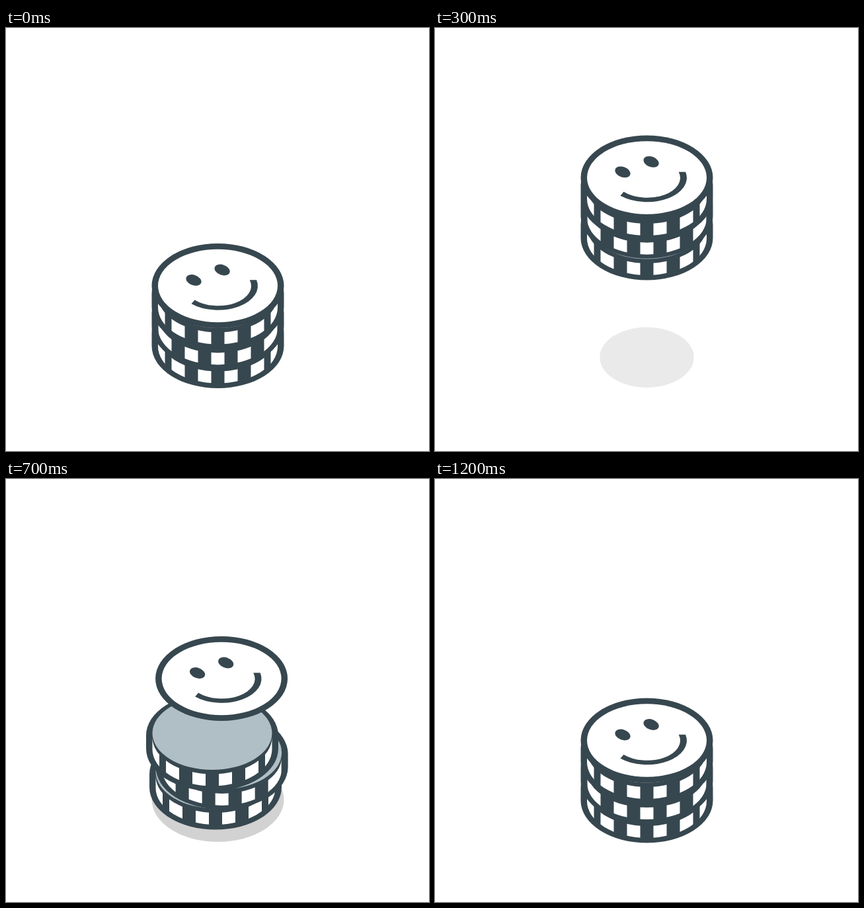
Recreate the animation shown at these times as an HTML page. Size 640 by 640 pixels, loop 1900 ms.

```html
<!DOCTYPE html>
<html lang="en">
<head>
<meta charset="utf-8">
<title>Bouncing stack</title>
<style>
  html, body { margin: 0; width: 100%; height: 100%; overflow: hidden; background: #fff; }
  svg { display: block; width: 100vw; height: 100vh; }
  .ink { fill: #37474f; }
  .paper { fill: #fff; }
  .lid { fill: #b0bec5; }
</style>
</head>
<body>
<svg viewBox="0 0 640 640">
  <defs>
    <clipPath id="rim">
      <path d="M-90.5 -17A90.5 55.5 0 0 0 90.5 -17V1A90.5 55.5 0 0 1 -90.5 1Z"/>
    </clipPath>
  </defs>
  <ellipse id="shadow"/>
  <g id="stack"></g>
  <g id="face">
    <ellipse class="ink" rx="100" ry="64"/>
    <ellipse class="paper" rx="90.5" ry="55.3"/>
    <ellipse class="ink" rx="12" ry="7.8" transform="translate(-36.5 -8.5) rotate(20)"/>
    <ellipse class="ink" rx="12" ry="7.8" transform="translate(6.6 -24) rotate(20)"/>
    <path class="ink" d="M-40 27.2A60 36.5 0 0 0 58.6 -8.8H48.2A50 30 0 0 1 -35 21.4Z"/>
  </g>
</svg>
<script>
const STEP = 100, LOOP = 1900, LAST = 1200, DROP = 140, CX = 320.5;

// rest: y on the ground, apex: jump height, leave: start of the drop,
// low: height on landing, hop: bounce height, end: settled, sway: sideways kick
const FACE = { rest: 395.5, apex: 207, leave: 575, low: 65, hop: 0, end: 1200, sway: 7 };
const UPPER = { rest: 427.5, apex: 208, leave: 539, low: 18, hop: 13, end: 1130, sway: -8.6 };
const MIDDLE = { rest: 457, apex: 211, leave: 500, low: 14, hop: 17, end: 1000, sway: 6.6 };
const LOWER = { rest: 486.5, apex: 207, leave: 459, low: 0, hop: 26.5, end: 1000, sway: -4 };

const $ = id => document.getElementById(id);
const jump = t => 1 - ((530 - t) / 537.2) ** 2;

// Dark and light bars, 20 wide; "shift" picks which of the two starts in the middle.
function bars(shift) {
  let d = "";
  for (let x = -110 + shift; x < 110; x += 40) d += `M${x} -20h20V70h-20Z`;
  return d;
}
// Even chips mirror their bars and keep a narrow one at each edge.
const ODD = bars(20);
const EVEN = [-90, -70, -30, 10, 50, 80]
  .map(x => `M${x < -80 ? -91 : x} -20H${x < -80 ? -80 : x + 20}V70H${x < -80 ? -91 : x}Z`).join("");

function makeChip(part, columns, inset) {
  const g = document.createElementNS("http://www.w3.org/2000/svg", "g");
  g.innerHTML =
    `<path class="ink" d="M-100 -20A100 64 0 0 1 100 -20V0A100 64 0 0 1 -100 0Z"/>
     <g transform="translate(0 ${inset})">
       <path class="paper" clip-path="url(#rim)" d="${columns}"/>
       <ellipse class="lid" cy="-23.5" rx="90.5" ry="55.5"/>
     </g>`;
  $("stack").append(g);
  part.el = g;
}

makeChip(LOWER, EVEN, 0);
makeChip(MIDDLE, ODD, 1.5);
makeChip(UPPER, EVEN, 0);
FACE.el = $("face");

// Sideways offset and height: rise, accelerating drop, then a settling bounce.
function pose(p, t) {
  const land = p.leave + DROP;
  if (t < p.leave) return { x: 0, h: p.apex * jump(t) };
  if (t < land) {
    const d = ((t - p.leave) / DROP) ** 2;
    const top = p.apex * jump(p.leave);
    return { x: p.sway * d, h: top + (p.low - top) * d };
  }
  const u = Math.min(1, (t - land) / (p.end - land));
  return { x: p.sway * (1 - u ** 1.5), h: (p.low + 4 * p.hop * u) * (1 - u) };
}

function drawShadow(t) {
  const airborne = t < LOWER.leave + DROP;
  const size = airborne ? 1 - 0.0017 * pose(LOWER, t).h : 1;
  const tone = Math.round(210 + 84 * (1 - size));
  const look = {
    cx: CX, cy: 485 + 46.5 * (1 - size), rx: 100 * size, ry: 64 * size,
    fill: `rgb(${tone},${tone},${tone})`, visibility: t > 0 ? "visible" : "hidden"
  };
  for (const key in look) $("shadow").setAttribute(key, look[key]);
}

function draw(t) {
  for (const p of [FACE, UPPER, MIDDLE, LOWER]) {
    const { x, h } = pose(p, t);
    p.el.setAttribute("transform", `translate(${CX + x} ${p.rest - h})`);
  }
  drawShadow(t);
}

const start = performance.now();
function tick() {
  const t = (performance.now() - start) % LOOP;
  draw(Math.min(LAST, Math.floor(t / STEP) * STEP));
  requestAnimationFrame(tick);
}
tick();
</script>
</body>
</html>
```
